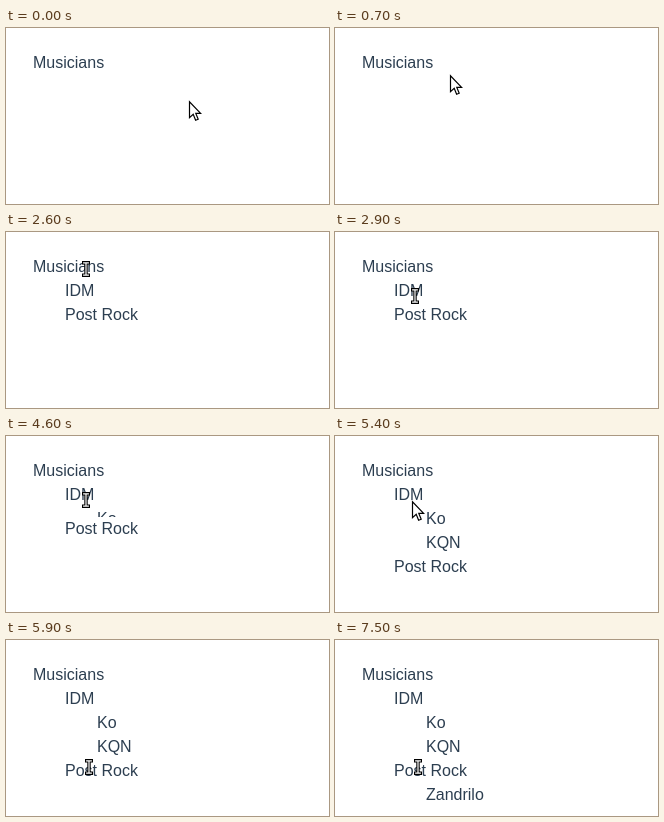
These frames come from a looping animation (323 by 176 pixels, 8000 ms). An HTML page:

```html
<!DOCTYPE html>
<html lang="en">
<head>
<meta charset="utf-8">
<title>Expanding tree</title>
<style>
  html, body { margin: 0; width: 100%; height: 100%; overflow: hidden; background: #fff; }
  svg { display: block; }
  text { font: 16px "Liberation Sans", Arial, sans-serif; fill: #2c3e50; }
  .line { fill: none; stroke: #000; stroke-width: 3.4; stroke-linecap: square; }
  .core { stroke: #fff; stroke-width: 1.2; }
</style>
</head>
<body>
<svg width="323" height="176" viewBox="0 0 323 176">
  <clipPath id="clip"><rect id="window" y="71" width="323"/></clipPath>
  <text x="27" y="40">Musicians</text>
  <text id="idm" x="59" y="64">IDM</text>
  <g id="bands" clip-path="url(#clip)">
    <text x="91" y="88">Ko</text>
    <text x="91" y="112">KQN</text>
  </g>
  <text id="rock" x="59">Post Rock</text>
  <text id="last" x="91" y="160">Zandrilo</text>
  <path id="arrow" d="M.5.8V16.6L4.2 13.2 6.6 19.3 9.2 18.2 6.8 12.4H11.6Z" fill="#fff" stroke="#000" stroke-width="1.2"/>
  <g id="beam">
    <path class="line" d="M-2.3-6.2H2.3M0-6.2V6.2M-2.3 6.2H2.3"/>
    <path class="line core" d="M-2.3-6.2H2.3M0-6.2V6.2M-2.3 6.2H2.3"/>
  </g>
</svg>
<script>
const $ = id => document.getElementById(id);
const LOOP = 8000, STEP = 100;

// Pointer moves: start time, then one [x, y, shape] per step
const moves = [
  [0, [183, 73, "arrow"]],
  [400, [172, 73, "arrow"]],
  [600, [148, 62, "arrow"], [115, 47, "arrow"], [89, 37, "beam"], [80, 33, "beam"]],
  [2600, [80, 37, "beam"], [76, 46, "arrow"], [76, 54, "arrow"], [80, 64, "beam"]],
  [5400, [77, 65, "arrow"], [78, 77, "arrow"], [79, 90, "arrow"],
         [80, 102, "arrow"], [81, 114, "arrow"], [83, 127, "beam"]]
];

const show = (id, on) => $(id).setAttribute("visibility", on ? "visible" : "hidden");

function pointer(t) {
  const [start, ...steps] = moves.findLast(m => m[0] <= t);
  const i = Math.min(steps.length - 1, Math.floor((t - start) / STEP));
  const [x, y, shape] = steps[i];
  for (const id of ["arrow", "beam"]) show(id, id === shape);
  $(shape).setAttribute("transform", `translate(${x} ${y})`);
}

function draw(t) {
  const open = t < 4600 ? 0 : t < 4700 ? 10 : 48;
  show("idm", t >= 1800);
  show("rock", t >= 1900);
  show("bands", open > 0);
  show("last", t >= 7500);
  $("window").setAttribute("height", open);
  $("rock").setAttribute("y", 88 + open);
  pointer(t);
}

function frame() {
  draw(performance.now() % LOOP);
  requestAnimationFrame(frame);
}
frame();
</script>
</body>
</html>
```
